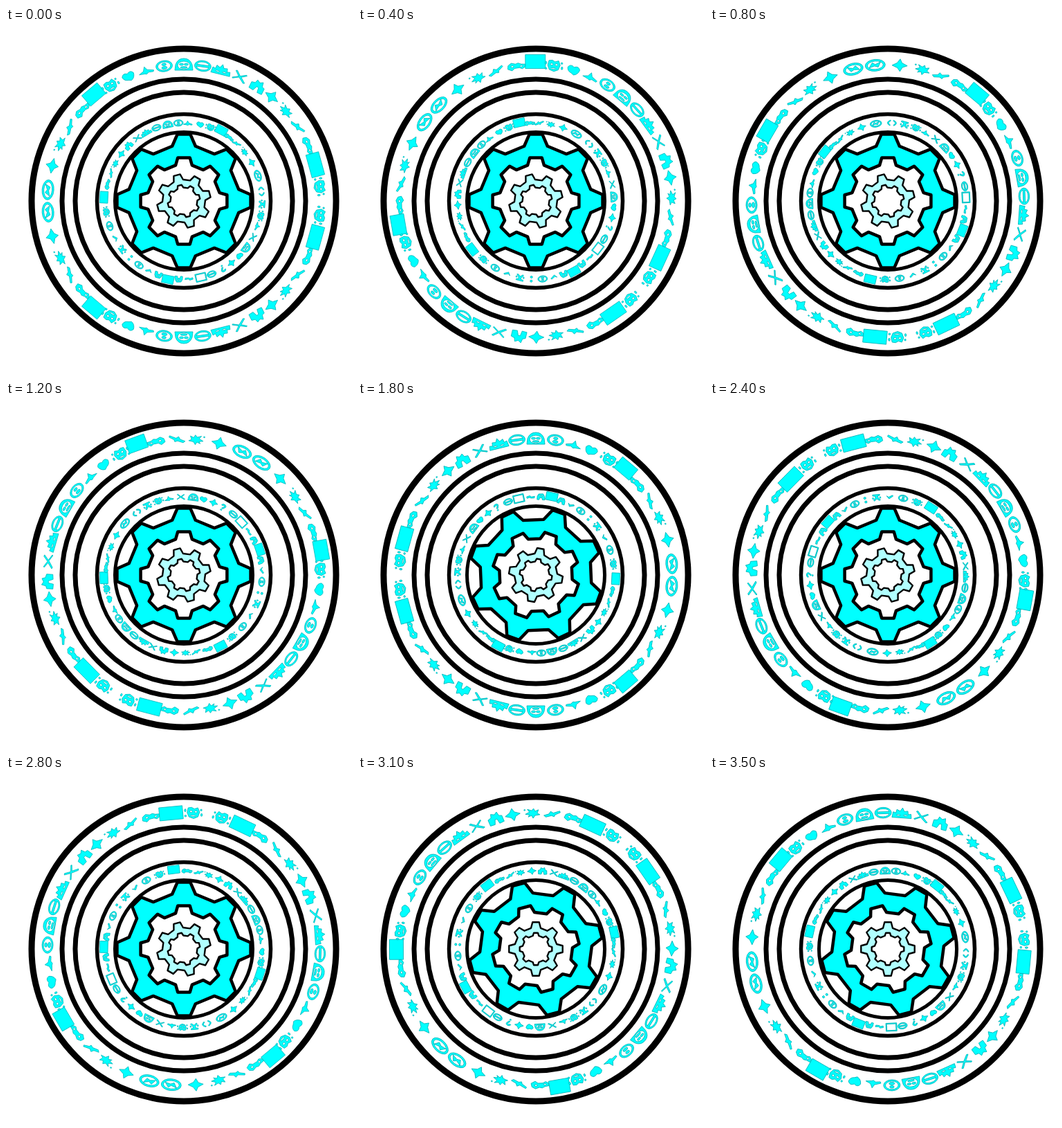
Animation, 500 px wide and 500 px high, one loop 3.6 s. Source, as an HTML page:

```html
<!DOCTYPE html>
<html lang="en">
<head>
<meta charset="utf-8">
<title>Rune wheel</title>
<style>
html, body { margin: 0; width: 100%; height: 100%; overflow: hidden; background: #fff; }
svg { display: block; width: 100vw; height: 100vh; }
.line { fill: #fff; stroke: #000; }
.glyph { fill: #0ff; fill-rule: evenodd; stroke: #00b4b8; stroke-width: .8; vector-effect: non-scaling-stroke; }
.gear { stroke: #000; stroke-linejoin: round; }
</style>
</head>
<body>
<svg id="stage" viewBox="0 0 500 500"></svg>
<script>
const NS = 'http://www.w3.org/2000/svg';
const CX = 257, CY = 250;
const STEP_MS = 100, STEPS = 36, STEP_DEG = 10, GEAR_STEPS = 4;

function add(parent, tag, attrs) {
  const el = document.createElementNS(NS, tag);
  for (const key in attrs) el.setAttribute(key, attrs[key]);
  return parent.appendChild(el);
}

function oval(x, y, rx, ry) {
  return `M${x - rx},${y}a${rx},${ry} 0 1 0 ${2 * rx},0a${rx},${ry} 0 1 0 ${-2 * rx},0Z`;
}

function box(w, h, y = 0) {
  return `M${-w / 2},${y - h / 2}h${w}v${h}h${-w}Z`;
}

// Each glyph is centred on 0,0 with its top facing outwards.
const glyphs = {
  info: oval(0, 0, 12, 8) + oval(0, 0, 9.3, 6) + oval(0, -2.4, 3.2, 1.8) + oval(0, 2.5, 4, 1.9),
  bar: oval(0, 0, 12, 7.8) + 'M-9,-1.4A9.2,5.5 0 0 1 9,-1.4ZM-9,1.4A9.2,5.5 0 0 0 9,1.4Z',
  helmet: 'M-13,8L-12,0Q-9,-9 0,-9T12,0L13,8Z' + oval(0, 1, 9, 6) + oval(-3.5, -.5, 3, 1.5) +
    oval(3.5, -.5, 3, 1.5) + oval(0, 4, 5, 1.3),
  coil: oval(0, 0, 14.5, 8.5) + oval(0, 0, 11.5, 6) + 'M-9,3L-4,-4L0,-1L8,-4L4,3L-1,1Z',
  cross: 'M-9,-6L-7,-7L0,-1L8,-6L9,-5L2,0L10,6L8,7L-1,1L-9,6L-10,5L-2,0Z',
  gift: 'M-10,8L-11,-1L-6,-3L-5,-8L0,-6L4,-9L6,-3L10,-2L11,7L4,8L2,1L-1,1L-3,8Z',
  star: 'M0,-9L3,-3.5L11,0L4,3L1,9L-3,4L-11,1L-4,-3Z',
  bird: 'M-10,2L-4,-1L-7,-5L-1,-3L2,-6L4,-2L9,-4L7,1L11,3L4,4L1,8L-1,4L-6,6L-4,3Z' + oval(-11, -4, 1, .8),
  jet: 'M-12,4L-5,1L-3,-3L1,-1L10,-5L11,-3L4,1L3,4L-1,3L-9,6Z',
  car: 'M-13,3L-12,-2L-7,-5L-1,-3L3,-4L7,-2L13,-1L12,3L8,5L4,3L-3,3L-7,6Z' + oval(-6, 0, 2, 1.4) + oval(7, 1, 2, 1.2),
  face: 'M-8,-7L-3,-8L1,-6L6,-8L9,-2L7,5L1,8L-6,6L-9,0Z' + oval(-3.5, -2, 2, 1.5) + oval(3.5, -2, 2, 1.5) +
    oval(0, 4, 4, 1) + oval(-12, -3, 1.2, 2) + oval(12, 2, 1.2, 2) + oval(-11, 5, 1.4, 1.2) + oval(11, -5, 1.2, 1.2),
  heart: 'M-9,-2Q-6,-8 0,-4Q6,-8 9,-2Q8,5 2,7L-2,5Q-8,4 -9,-2Z',
  plane: 'M-11,4L-4,1L-1,-5L2,0L11,3L10,5L3,4L0,6L-3,5Z',
  ship: 'M-14,7L-13,-1L-9,0L-8,-5L-3,-3L0,-8L3,-3L8,-4L9,1L13,0L14,6Z' + oval(-5, 3, 3, 1) + oval(5, 2.5, 3, 1),
  block: box(29, 20, -4.5),
  slab: box(34, 19),
  frame: box(27, 20) + box(23, 16),
  arcs: 'M-4,-7Q-18,0 -5,7L-4,5Q-13,0 -3,-5ZM4,-7Q18,0 5,7L4,5Q13,0 3,-5Z',
  figure: 'M-9,-8L9,-7L8,-4L3,-4L4,1L9,7L6,8L0,3L-6,8L-8,6L-3,0L-3,-4L-9,-5Z' + oval(-9, 1, 1.5, 2) + oval(9, 1, 1.5, 2),
  ask: 'M-6,-4Q-4,-9 2,-8Q9,-5 4,0L1,4L-2,3L3,-3Q1,-7 -4,-3Z' + oval(-1, 7.5, 2, 1.5),
  dash: 'M-10,-1L-2,-3L2,0L10,-1L9,3L1,3L-3,1L-9,3Z',
  robot: 'M-9,7L-9,-1L-6,-7L5,-8L9,-2L10,7L4,7L3,2L-3,2L-4,7Z' + oval(-3, -3, 2, 1.4) + oval(3, -3, 2, 1.4),
  tick: 'M-8,-2L-3,1L6,-4L8,-2L-2,5Z',
  colon: oval(0, -5, 2.8, 2.6) + oval(0, 5, 2.8, 2.6)
};

const outerHalf = `coil -85.3 star -75 bird -65.3 jet -57 car -48.2 block -40.2 face -32.4
  heart -24 plane -16.2 info -8.3 helmet 0 bar 8 ship 16 cross 24.3 gift 32.8 star 40.2
  bird 48.5 jet 57 car 66 slab 74.6 face 84`;

const innerAll = `info -4 plane 3 heart 12 face 20 block 28 car 35.5 jet 42.5 bird 51 star 60.5
  coil 71.2 arcs 83 figure 92.3 face 101 plane 109 cross 117.8 helmet 127 heart 134.5 star 142.4
  ask 150 bar 159.2 frame 167.4 dash 176.2 robot 183.7 block 191.5 robot 199 tick 206.7
  info 215 colon 223.3 figure 231.7 tick 241.5 info 251.3 face 262 block 272.7 car 282.3
  jet 291 bird 298.5 star 307 gift 315 cross 323.5 ship 331.2 bar 339.5 helmet 348`;

function placeGlyphs(parent, list, radius, scale) {
  const words = list.trim().split(/\s+/);
  for (let i = 0; i < words.length; i += 2) {
    add(parent, 'path', {
      class: 'glyph', d: glyphs[words[i]],
      transform: `rotate(${words[i + 1]}) translate(0 ${-radius}) scale(${scale})`
    });
  }
}

// Eight teeth; tip and base give half-widths in degrees.
function gearPath(tipR, rootR, tip, base) {
  const points = [];
  for (let k = 0; k < 8; k++) {
    for (const [r, off] of [[rootR, -base], [tipR, -tip], [tipR, tip], [rootR, base]]) {
      const a = (k * 45 + off) * Math.PI / 180;
      points.push((r * Math.sin(a)).toFixed(2) + ',' + (-r * Math.cos(a)).toFixed(2));
    }
  }
  return 'M' + points.join('L') + 'Z';
}

function addGear(parent, fill, width, ...shape) {
  add(parent, 'path', { class: 'gear', d: gearPath(...shape), fill, 'stroke-width': width });
}

const wheel = add(document.getElementById('stage'), 'g', { transform: `translate(${CX} ${CY})` });
for (const [r, width] of [[220, 9], [176, 7], [157, 7], [125.5, 5.5], [99.5, 5]]) {
  add(wheel, 'circle', { class: 'line', r, 'stroke-width': width });
}

const outer = add(wheel, 'g');
placeGlyphs(outer, outerHalf, 197, 1);
placeGlyphs(add(outer, 'g', { transform: 'scale(1 -1)' }), outerHalf, 197, 1);

const inner = add(wheel, 'g');
placeGlyphs(inner, innerAll, 113, .58);

const bigGear = add(wheel, 'g');
addGear(bigGear, '#0ff', 4.5, 97, 81, 5.5, 12);
addGear(bigGear, '#fff', 4.5, 63, 53, 8, 13);

const smallGear = add(wheel, 'g');
addGear(smallGear, '#b0ffff', 2.4, 39, 31, 7, 13);
addGear(smallGear, '#fff', 2.4, 23.5, 19.5, 7, 13);

function turn(el, deg) {
  el.setAttribute('transform', `rotate(${deg})`);
}

function draw() {
  const step = Math.floor(performance.now() / STEP_MS) % STEPS;
  const gearStep = step % GEAR_STEPS;
  turn(outer, step * STEP_DEG);
  turn(inner, -step * STEP_DEG);
  turn(bigGear, gearStep * STEP_DEG);
  turn(smallGear, 30 - gearStep * STEP_DEG);
  requestAnimationFrame(draw);
}
draw();
</script>
</body>
</html>
```
